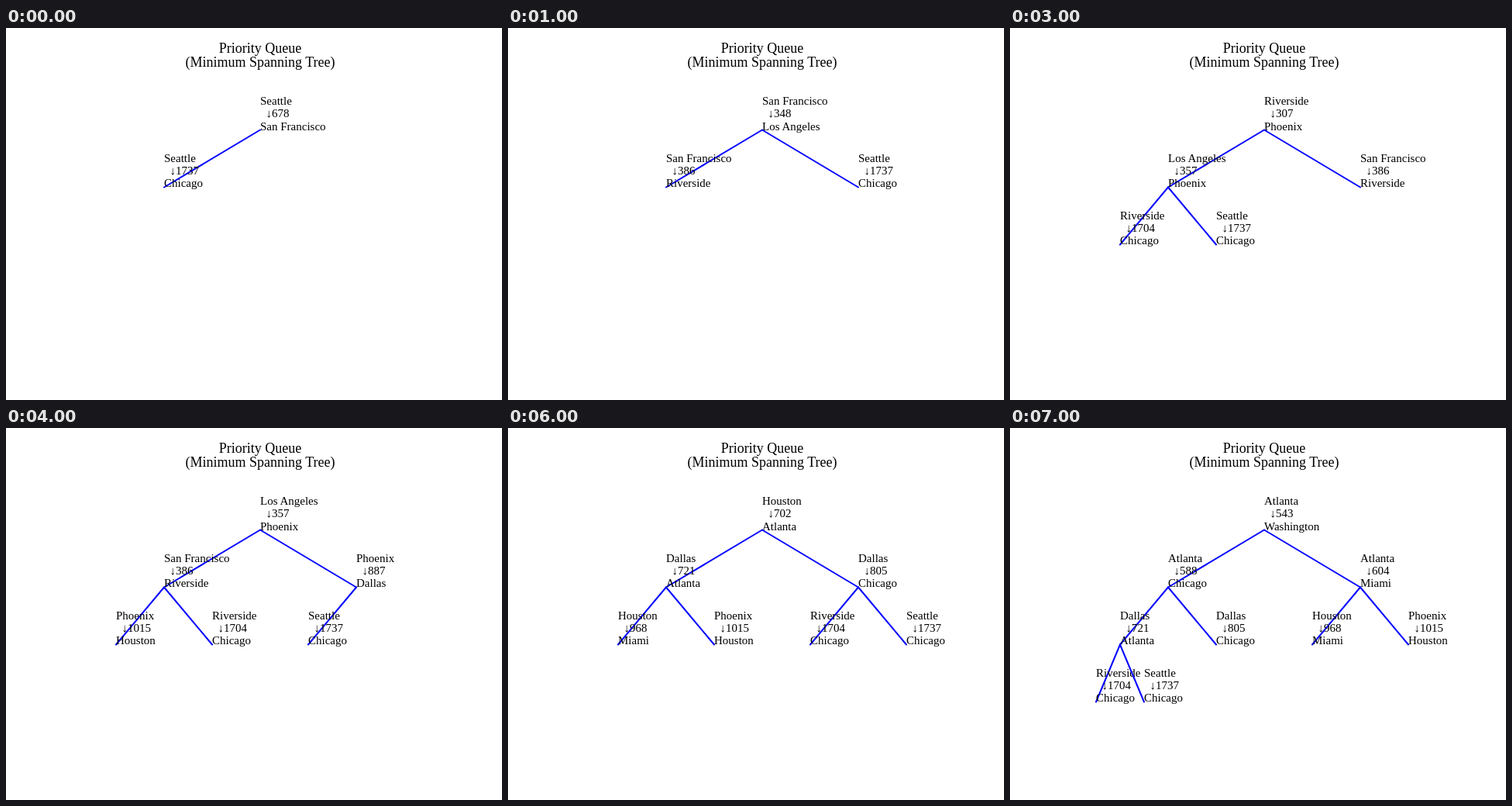
An HTML page for the animation above (8000 ms loop, 640 px wide and 480 px high).

```html
<!DOCTYPE html>
<html lang="en">
<head>
<meta charset="utf-8">
<title>Priority Queue</title>
<style>
  html, body { margin: 0; width: 100%; height: 100%; overflow: hidden; background: #fff; }
  #stage { position: relative; width: 640px; height: 480px; overflow: hidden; background: #fff;
    color: #000; font-family: "Liberation Serif", "Times New Roman", serif; }
  .scene, .scene svg { position: absolute; left: 0; top: 0; width: 640px; height: 480px; }
  .scene { visibility: hidden; }
  .text { position: absolute; font-size: 15px; line-height: 16px; white-space: pre; }
  .title { position: absolute; left: 8px; top: 17px; width: 640px; text-align: center;
    font-size: 18px; line-height: 18px; }
  line { stroke: #00f; stroke-width: 2; stroke-linecap: round; }
</style>
</head>
<body>
<div id="stage">
  <div class="title">Priority Queue<br>(Minimum Spanning Tree)</div>
</div>
<script>
const STEP = 1000;
const ROOT = { x: 328, y: 131.5 }, SPREAD = 124, DROP = 74;
const SVG = 'http://www.w3.org/2000/svg';
const stage = document.getElementById('stage');

const cities = {
  S: 'Seattle', F: 'San Francisco', L: 'Los Angeles', R: 'Riverside', P: 'Phoenix', C: 'Chicago',
  D: 'Dallas', H: 'Houston', A: 'Atlanta', M: 'Miami', W: 'Washington'
};

// Each queue lists its edges in order: from, to, distance.
const queues = [
  'SF678 SC1737',
  'FL348 FR386 SC1737',
  'LR50 LP357 FR386 SC1737',
  'RP307 LP357 FR386 RC1704 SC1737',
  'LP357 FR386 PD887 PH1015 RC1704 SC1737',
  'DH225 DA721 DC805 PH1015 RC1704 SC1737',
  'HA702 DA721 DC805 HM968 PH1015 RC1704 SC1737',
  'AW543 AC588 AM604 DA721 DC805 HM968 PH1015 RC1704 SC1737'
].map(q => q.split(' '));

function addText(scene, text, x, y) {
  const el = document.createElement('div');
  el.className = 'text';
  el.textContent = text;
  el.style.left = x + 'px';
  el.style.top = y + 'px';
  scene.append(el);
}

function addLine(scene, x1, y1, x2, y2) {
  const svg = document.createElementNS(SVG, 'svg');
  const line = document.createElementNS(SVG, 'line');
  Object.entries({ x1, y1, x2, y2 }).forEach(([k, v]) => line.setAttribute(k, v));
  svg.append(line);
  scene.append(svg);
}

function drawNode(scene, queue, i, x, y, spread) {
  const [from, to] = queue[i];
  const top = Math.floor(y) - 45;
  addText(scene, cities[from], x, top);
  addText(scene, '  ↓' + queue[i].slice(2), x, top + 16);
  addText(scene, cities[to], x, top + (i ? 32 : 33));
  [-1, 1].forEach((side, k) => {
    const child = 2 * i + 1 + k;
    if (child >= queue.length) return;
    const cx = x + side * spread, cy = y + DROP;
    addLine(scene, x, y, cx, cy);
    drawNode(scene, queue, child, cx, cy, spread / 2);
  });
}

queues.forEach((queue, i) => {
  const scene = document.createElement('div');
  scene.className = 'scene';
  drawNode(scene, queue, 0, ROOT.x, ROOT.y, SPREAD);
  stage.append(scene);
  const n = queues.length;
  const anim = scene.animate([
    { visibility: 'visible', offset: 0, easing: 'step-end' },
    { visibility: 'hidden', offset: 1 / n },
    { visibility: 'hidden', offset: 1 }
  ], { duration: n * STEP, delay: (i - n) * STEP, iterations: Infinity });
  anim.startTime = 0;
});
</script>
</body>
</html>
```
